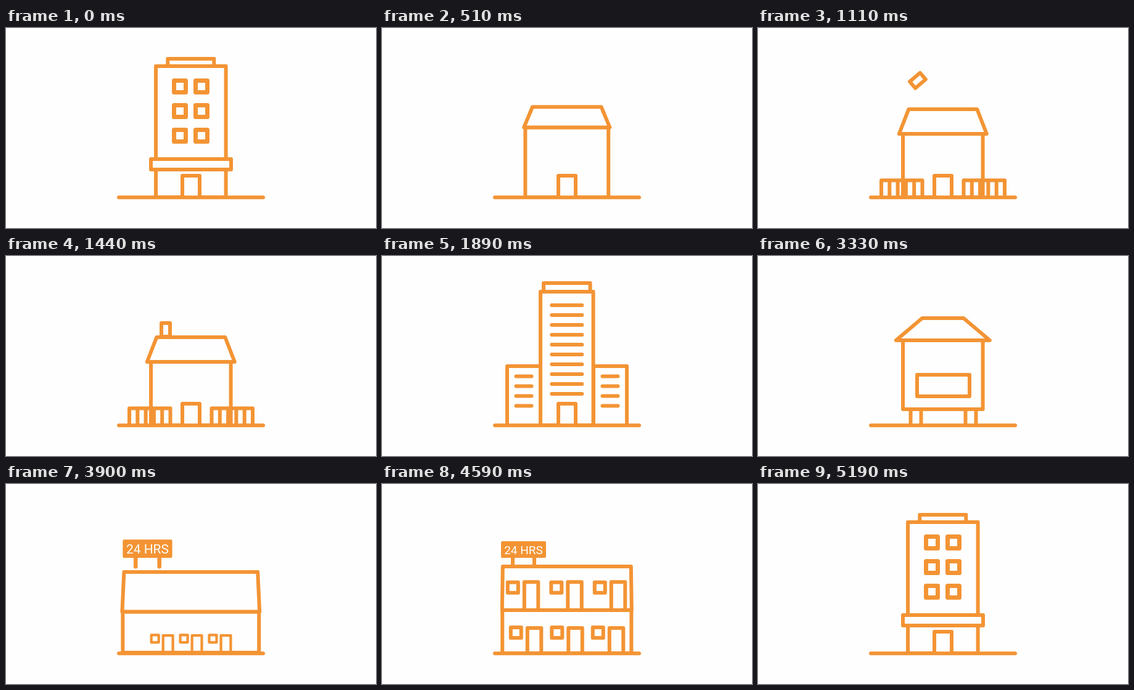
Recreate the animation shown at these times as an HTML page. Size 600x325 px, loop 5490 ms.

```html
<!DOCTYPE html>
<html lang="en">
<head>
<meta charset="utf-8">
<title>Places to stay</title>
<style>
  html, body { margin: 0; width: 100%; height: 100%; overflow: hidden; background: #fefefe; }
  svg { display: block; width: 100vw; height: 100vh; }
  path { fill: none; stroke: #f39434; stroke-width: 6; stroke-linecap: round; stroke-linejoin: round; }
  .solid { fill: #fefefe; }
  text { font: 400 19px Roboto, Arial, sans-serif; fill: #fefefe; text-anchor: middle; }
</style>
</head>
<body>
<svg viewBox="0 0 600 325">
  <path id="wings"/>
  <path id="wingLines"/>
  <path id="chimney"/>
  <g id="sign">
    <path d="M212 120V133M247 120V133"/>
    <path d="M195 95H264V118H195Z" style="fill:#f39434;stroke-width:4"/>
    <text x="229.5" y="113.5">24 HRS</text>
  </g>
  <path id="legs"/>
  <path id="body" class="solid"/>
  <path id="roof" class="solid"/>
  <path id="hotelWindows"/>
  <path id="towerLines"/>
  <path id="hutWindow"/>
  <path id="canopy" class="solid"/>
  <path id="door" class="solid"/>
  <path id="fence"/>
  <path id="lowerRooms"/>
  <path id="upperRooms"/>
  <path d="M183 275.2H417"/>
</svg>
<script>
const LOOP = 5490, STEP = 30, LAST = 5190;
const MID = 299.8, GROUND = 275;
const MORPH = 440, POP = 300, HIDE = 130, SQUASH = .075;

// Walls and roof of each building: half widths and heights.
const BUILDINGS = [
  { start: 4620, half: 56.8, top: 62, base: GROUND, ridge: 37.5, peak: 50, eave: 37.5 },
  { start: 350, half: 64.8, top: 172, base: GROUND, ridge: 55.5, peak: 132, eave: 71 },
  { start: 1440, half: 42.8, top: 58, base: GROUND, ridge: 37.8, peak: 44, eave: 37.8 },
  { start: 2260, half: 64.8, top: 137, base: 249, ridge: 33.5, peak: 101, eave: 76 },
  { start: 3660, half: 104.6, top: 205, base: GROUND, ridge: 104, peak: 134, eave: 105 }
];
const [HOTEL, HOUSE, TOWER, HUT, MOTEL] = BUILDINGS.keys();
const at = i => BUILDINGS[(i + BUILDINGS.length) % BUILDINGS.length];

const clamp = v => Math.min(1, Math.max(0, v));
const lerp = (a, b, p) => a + (b - a) * p;
const easeOut = p => 1 - (1 - p) ** 4;
const backOut = p => 1 + 2.7 * (p - 1) ** 3 + 1.7 * (p - 1) ** 2;
const elapsed = (t, from) => (t - from + LOOP) % LOOP;

// Blend from the previous building, squashed or stretched on arrival.
function shape(t) {
  const ages = BUILDINGS.map(b => elapsed(t, b.start));
  const i = ages.indexOf(Math.min(...ages));
  const from = at(i - 1), to = at(i), p = clamp(ages[i] / MORPH);
  const squash = SQUASH * Math.sin(Math.PI * p) ** 2 * Math.sign(to.peak - from.peak);
  const mix = key => lerp(from[key], to[key], easeOut(p));
  const wide = key => mix(key) * (1 + squash);
  const high = key => GROUND - (GROUND - mix(key)) * (1 - squash);
  return {
    half: wide('half'), ridge: wide('ridge'), eave: wide('eave'),
    top: high('top'), base: high('base'), peak: high('peak')
  };
}

// Size of a detail that pops in with one building and leaves after another.
function present(t, first, last, delay) {
  const { start } = at(first);
  const age = elapsed(t, start), life = elapsed(at(last + 1).start, start);
  return age < life ? backOut(clamp((age - delay) / POP)) : clamp(1 - (age - life) / HIDE);
}

const el = id => document.getElementById(id);
const box = (cx, cy, w, h) => `M${cx - w / 2} ${cy - h / 2}h${w}v${h}h${-w}Z`;
const arch = (l, t, r, b) => `M${l} ${b}V${t}H${r}V${b}`;
const dash = (cx, y, half) => `M${cx - half} ${y}h${2 * half}`;
const repeat = (n, f) => Array.from({ length: n }, (_, i) => f(i)).join('');

function show(id, amount, d, width = 6) {
  const path = el(id);
  path.style.display = amount > .02 ? '' : 'none';
  path.setAttribute('d', d);
  path.style.strokeWidth = width * clamp(amount);
}

// Three window and door pairs, scaled about the middle of their floor.
function rooms(id, scale, floor, firstWindow, gap, windowY, doorTop) {
  const x = v => 300 + (v - 300) * scale, y = v => floor + (v - floor) * scale;
  show(id, scale, repeat(3, i => {
    const left = firstWindow + gap * i;
    return box(x(left), y(windowY), 17 * scale, 17 * scale)
      + arch(x(left + 18.5), y(doorTop), x(left + 41), floor);
  }));
}

function drawChimney(t, house) {
  const toss = clamp((t - 1000) / 400);
  const y = lerp(145, 120, toss) - 265 * toss * (1 - toss) + 40 * (1 - house);
  show('chimney', toss && house > .02 ? 1 : 0, box(0, 0, 14, 22));
  el('chimney').setAttribute('transform', `translate(259 ${y}) rotate(${180 * toss})`);
}

function draw(t) {
  const { half, top, base, ridge, eave, peak } = shape(t);
  show('body', 1, box(MID, (top + base) / 2, 2 * half, base - top));
  show('roof', 1, `M${MID - ridge} ${peak}H${MID + ridge}L${MID + eave} ${top}H${MID - eave}Z`);
  show('legs', base < GROUND - 1 ? 1 : 0,
    [36, 53].map(x => `M${300.5 - x} ${base}V${GROUND}M${300.5 + x} ${base}V${GROUND}`).join(''));

  const stretch = b => (GROUND - top) / (GROUND - at(b).top);

  const hotel = present(t, HOTEL, HOTEL, 130);
  show('hotelWindows', hotel, repeat(6, i => box(282 + 35 * (i % 2),
    GROUND - (180 - 40 * (i >> 1)) * stretch(HOTEL), 19 * hotel, 19 * hotel)), 7);
  const canopy = present(t, HOTEL, HOTEL, 80);
  show('canopy', canopy, box(300, 221.5, 130 * canopy, 17 * canopy));
  const door = present(t, HOTEL, TOWER, 80);
  show('door', door, arch(286, GROUND - 35 * door, 314, GROUND));

  const fence = present(t, HOUSE, HOUSE, 300), rail = GROUND - 27.5 * fence;
  show('fence', fence, [200, 333.5].map(x => `M${x} ${rail}h66.5`
    + repeat(6, i => `M${x + 13.3 * i} ${rail}V${GROUND}`)).join(''));
  drawChimney(t, present(t, HOUSE, HOUSE, 0));

  const wings = present(t, TOWER, TOWER, 80), wingTop = GROUND - 96 * wings;
  show('wings', wings, arch(203, wingTop, 258, GROUND) + arch(343, wingTop, 397, GROUND));
  const lines = present(t, TOWER, TOWER, 130);
  show('wingLines', lines, repeat(4, i => {
    const y = GROUND - (79.5 - 16 * i) * wings;
    return dash(230, y, 12.5 * lines) + dash(370, y, 12.5 * lines);
  }));
  show('towerLines', lines,
    repeat(10, i => dash(MID, GROUND - (195 - 16 * i) * stretch(TOWER), 24.5 * lines)));

  const hut = present(t, HUT, HUT, 100);
  show('hutWindow', hut, box(300.5, 210.5, 85 * hut, 35 * hut));

  const sign = present(t, MOTEL, MOTEL, 60);
  el('sign').style.display = sign > .02 ? '' : 'none';
  el('sign').setAttribute('transform', `translate(230 120) scale(${sign}) translate(-230 -120)`);
  rooms('lowerRooms', present(t, MOTEL, MOTEL, 180), GROUND, 217.3, 66.5, 241.5, 234);
  rooms('upperRooms', present(t, MOTEL, MOTEL, 270), 205, 212.3, 70.5, 168.3, 159.3);
}

const begin = performance.now();
function tick() {
  const t = (performance.now() - begin) % LOOP;
  draw(Math.min(LAST, Math.floor(t / STEP) * STEP));
  requestAnimationFrame(tick);
}
tick();
</script>
</body>
</html>
```
